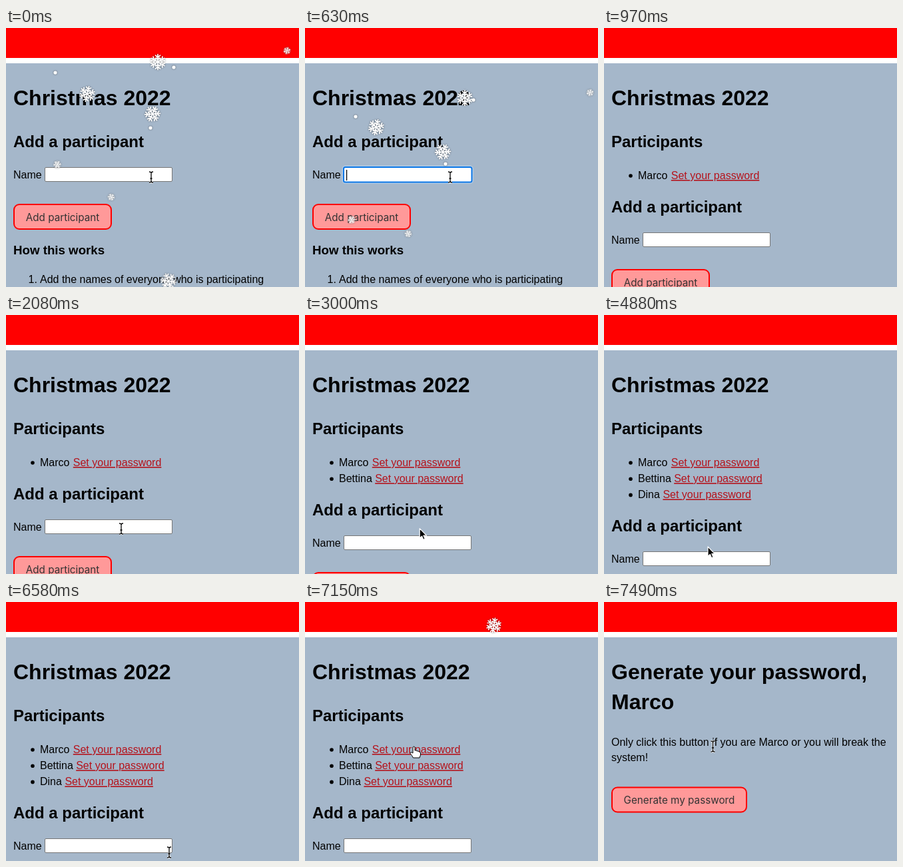
An HTML page that plays this animation: 440x389 px, repeating every 8 s.

```html
<!DOCTYPE html>
<html lang="en">
<head>
<meta charset="utf-8">
<title>Gift exchange</title>
<style>
html, body { margin: 0; width: 100%; height: 100%; overflow: hidden; background: #a5b7ca; }
svg { display: block; width: 440px; height: 389px; }
text { font: 16px "Liberation Sans", Arial, sans-serif; fill: #000; white-space: pre; }
.h1 { font-size: 32px; font-weight: bold; }
.h2 { font-size: 24px; font-weight: bold; }
.h3 { font-size: 18.72px; font-weight: bold; }
.link { fill: #b5121b; text-decoration: underline; }
.btn rect { fill: #f99; stroke: red; stroke-width: 2; }
.btn text { font: 15.25px Inter, sans-serif; fill: #333; text-anchor: middle; }
.flake { fill: none; stroke: #fff; stroke-width: 1.7; stroke-linecap: round; }
.snow { filter: drop-shadow(.8px .9px .8px rgba(0, 0, 0, .55)); }
</style>
</head>
<body>
<svg viewBox="0 0 440 389">
  <defs>
    <path id="arm" d="M0 0V-11M-3.3-9.6L0-6.6L3.3-9.6M-2.6-5.8L0-3.5L2.6-5.8"/>
    <g id="flake" class="flake">
      <use href="#arm"/>
      <use href="#arm" transform="rotate(60)"/>
      <use href="#arm" transform="rotate(120)"/>
      <use href="#arm" transform="rotate(180)"/>
      <use href="#arm" transform="rotate(240)"/>
      <use href="#arm" transform="rotate(300)"/>
    </g>
    <path id="beam" d="M-3-8Q0-8 0-6Q0-8 3-8M0-6V6M-3 8Q0 8 0 6Q0 8 3 8M-1.5 2H1.5" fill="none"/>
  </defs>

  <rect width="440" height="389" fill="#a5b7ca"/>
  <rect width="440" height="45" fill="red"/>
  <rect y="45" width="440" height="8" fill="#fff"/>

  <g id="home">
    <text class="h1" x="11" y="116">Christmas 2022</text>
    <text class="h2" id="listTitle" x="11" y="179">Participants</text>
    <g id="list"></g>
    <g id="form">
      <text class="h2" x="11" y="179">Add a participant</text>
      <text x="11" y="226">Name</text>
      <rect x="58.5" y="209.5" width="191" height="21" rx="1.5" fill="#fff" stroke="#767676"/>
      <g id="focus">
        <rect x="57.5" y="208.5" width="193.5" height="23.5" rx="3" fill="none" stroke="#b9d8f6" stroke-width="4" opacity=".6"/>
        <rect x="58" y="209" width="192.5" height="22.5" rx="2.5" fill="#fff" stroke="#0b76e6" stroke-width="2"/>
        <text id="typed" x="62" y="226"></text>
        <rect id="caret" y="213" width="1.2" height="16"/>
      </g>
      <g class="btn">
        <rect x="12" y="265" width="146" height="37" rx="8"/>
        <text x="85" y="289.5">Add participant</text>
      </g>
      <text class="h3" x="11" y="340">How this works</text>
      <text x="33.5" y="383">1.</text>
      <text x="51" y="383">Add the names of everyone who is participating</text>
    </g>
  </g>

  <g id="reveal">
    <text class="h1" x="11" y="116">Generate your password,</text>
    <text class="h1" x="11" y="161">Marco</text>
    <text x="11" y="216">Only click this button if you are Marco or you will break the</text>
    <text x="11" y="239">system!</text>
    <g class="btn">
      <rect x="12" y="278.5" width="202" height="37" rx="8"/>
      <text x="113" y="303">Generate my password</text>
    </g>
  </g>

  <g id="snow" class="snow"></g>
  <g id="late" class="snow"><use href="#flake" transform="rotate(10)"/></g>

  <g id="cursor" stroke-linejoin="round">
    <path id="arrow" d="M0 0V14.5L3.3 11.5L5.6 16.8L8 15.8L5.8 10.6H10.3Z" stroke="#fff" stroke-width="1.2"/>
    <g id="ibeam">
      <use href="#beam" stroke="#fff" stroke-width="3"/>
      <use href="#beam" stroke="#000" stroke-width="1.3"/>
    </g>
    <path id="hand" d="M-1.5 1Q0-1 1.5 1V6Q4 5 4.5 7Q7 6 7.5 8Q10 7.500 10 10V13Q9 15 8.500 17H-1Q-3 13-5.500 10.500Q-5.500 8-3 9L-1.500 10Z" fill="#fff" stroke="#000"/>
  </g>
</svg>
<script>
const LOOP = 8000;
const $ = id => document.getElementById(id);
const show = (id, on) => { $(id).style.display = on ? '' : 'none'; };
const move = (el, x, y) => el.setAttribute('transform', `translate(${x.toFixed(2)} ${y.toFixed(2)})`);
const within = (t, a, b) => t >= a && t < b;

// focus: input focused, type: first key, step: ms per key, load: page with the new name
const entries = [
  { name: 'Marco', linkX: 100.8, focus: 400, type: 680, step: 45, load: 920 },
  { name: 'Bettina', linkX: 105.2, focus: 2130, type: 2490, step: 57, load: 2940 },
  { name: 'Dina', linkX: 88.4, focus: 3990, type: 4350, step: 75, load: 4820 }
];
const shifts = [0, 98, 122, 146];

const rows = entries.map((e, i) => {
  const y = 227 + 24.2 * i;
  $('list').insertAdjacentHTML('beforeend',
    `<g><circle cx="40" cy="${y - 5}" r="2.8"/><text x="51" y="${y}">${e.name}</text>` +
    `<text class="link" x="${e.linkX}" y="${y}">Set your password</text></g>`);
  return $('list').lastChild;
});

// x, y, drift x, fall y per 630 ms, radius
const flakes = [
  [228, 51, 12, 54, 12], [122, 99, -15, 50, 12], [220, 129, -13, 57, 12], [244, 380, 6, 55, 12],
  [422, 34, 6, 63, 5.5], [77, 205, -7, 83, 6], [158, 254, -3, 55, 5.5],
  [74, 67, 2, 66, 2.6], [252, 59, 1, 49, 2.6], [217, 150, -6, 54, 2.6]
].map(([x, y, dx, dy, r], i) => {
  $('snow').insertAdjacentHTML('beforeend', r < 4
    ? `<g><circle r="${r}" fill="#fff"/></g>`
    : `<g><use href="#flake" transform="rotate(${i * 13 % 40}) scale(${r / 11.5})"/></g>`);
  return { el: $('snow').lastChild, x, y, dx, dy };
});

const track = [
  [0, 218, 224], [1630, 218, 224], [2060, 173, 321], [3360, 172, 320.500],
  [3660, 164, 371], [3950, 156, 348], [5230, 156, 348], [5460, 438, 384],
  [5750, 438, 384], [5810, 460, 400], [6579, 460, 400], [6580, 245, 376],
  [7050, 163.500, 217], [LOOP, 163.500, 217]
];

function pointer(t) {
  const i = track.findIndex(k => k[0] > t);
  const [t0, x0, y0] = track[i - 1], [t1, x1, y1] = track[i];
  const u = (t - t0) / (t1 - t0), e = u * u * (3 - 2 * u);
  return [x0 + (x1 - x0) * e, y0 + (y1 - y0) * e];
}

function cursorShape(t, x, y, shift) {
  if (entries.some(e => within(t, e.type, e.load + 55))) return '';
  if (t >= 7430) return t < 7490 ? 'hand' : 'ibeam';
  if (x > 58 && x < 250 && y > 209 + shift && y < 232 + shift) return 'ibeam';
  const onLink = entries.some((e, i) =>
    x > e.linkX && x < e.linkX + 132 && Math.abs(y - 221 - 24.2 * i) < 9);
  return t > 6580 && onLink ? 'hand' : 'arrow';
}

function render(t) {
  const count = entries.filter(e => t >= e.load).length;
  const shift = shifts[count];
  show('home', t < 7430);
  show('reveal', t >= 7430);
  show('listTitle', count > 0);
  rows.forEach((row, i) => { row.style.display = i < count ? '' : 'none'; });
  move($('form'), 0, shift);

  const entry = entries[count];
  const focused = entry && t >= entry.focus;
  show('focus', focused);
  if (focused) {
    const keys = t < entry.type ? 0 : Math.floor((t - entry.type) / entry.step) + 1;
    $('typed').textContent = entry.name.slice(0, keys);
    $('caret').setAttribute('x', 62 + (keys ? $('typed').getComputedTextLength() : 0));
  }

  show('snow', t < 920);
  for (const f of flakes) move(f.el, f.x + f.dx * t / 630, f.y + f.dy * t / 630);
  show('late', within(t, 6580, 7430));
  const fall = (t - 6580) / 790;
  move($('late'), 272 + 16 * fall, -14 + 68 * fall);

  const [x, y] = pointer(t);
  const shape = cursorShape(t, x, y, shift);
  for (const id of ['arrow', 'ibeam', 'hand']) show(id, id === shape);
  move($('cursor'), x, y);
}

function tick() {
  render(performance.now() % LOOP);
  requestAnimationFrame(tick);
}
tick();
</script>
</body>
</html>
```
